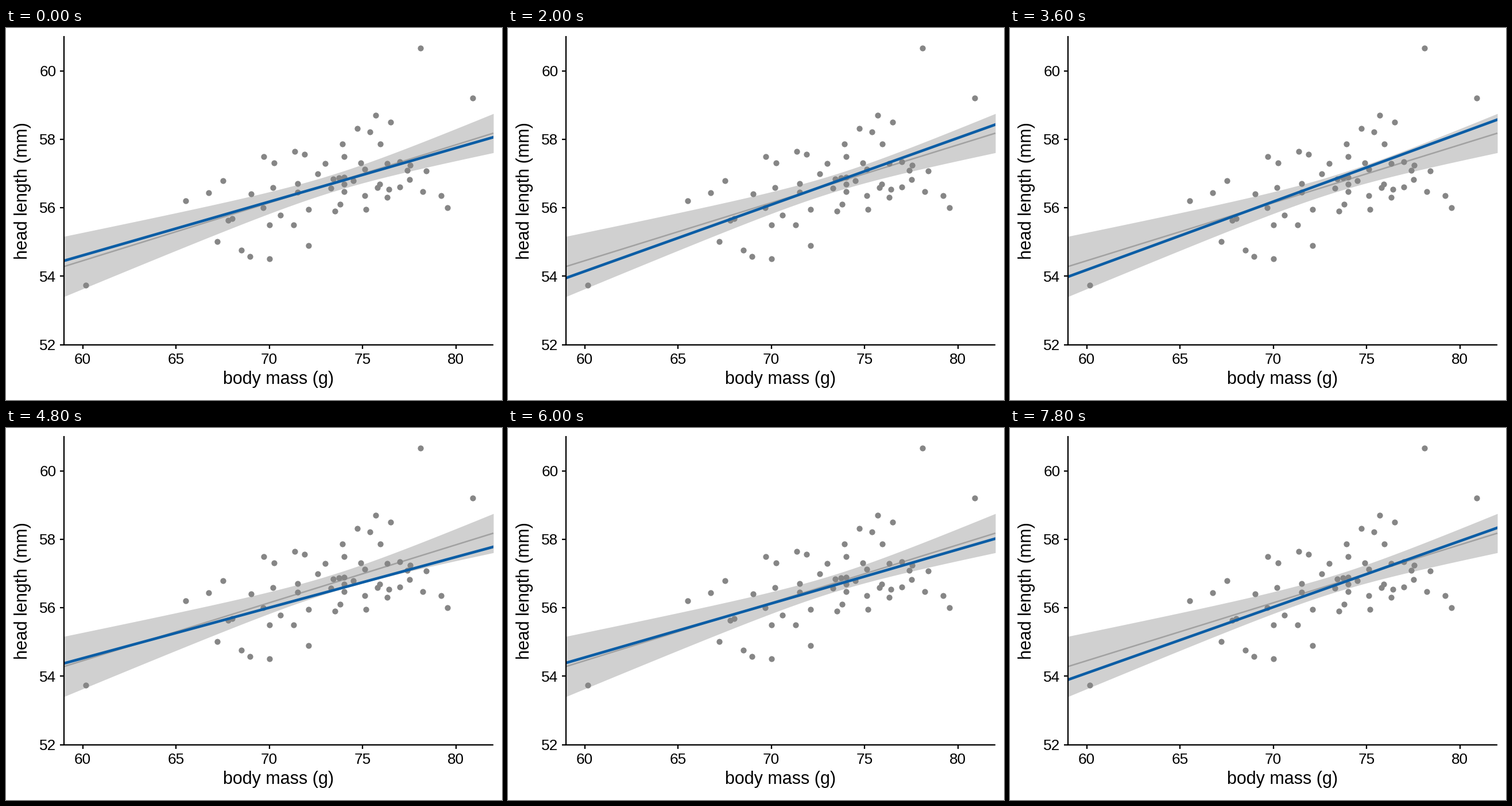
A matplotlib script that plays this animation: 864x648 px, repeating every 8 s.

```python
import numpy as np
import matplotlib.pyplot as plt
from matplotlib.animation import FuncAnimation
from matplotlib.patches import Rectangle

W, H = 864, 648
LEFT, RIGHT, TOP, BOTTOM = 101, 849, 14, 551.5
BLUE, POINT, MEAN, BAND = "#0b5da5", "#868686", "#a2a2a2", "#d0d0d0"
STEP_MS, FRAMES = 200, 40

plt.rcParams["font.family"] = "Liberation Sans"

# scatter, in stage pixels
POINTS = np.array([
    (722, 34.5), (813, 122.3), (644, 152), (670, 164), (611.5, 175.3),
    (634, 181), (585.5, 202), (652, 202), (502.5, 215.3), (520.3, 220),
    (449, 223.5), (588.5, 223.5), (467, 234.5), (556, 235.5), (618, 234.5),
    (663.5, 235.5), (686, 233), (703.5, 238.5), (699, 247.5), (624.5, 246),
    (732, 249.3), (543, 253.5), (377.5, 265.5), (569.5, 262.5), (580, 260.5),
    (588.5, 259.5), (605, 265.5), (702.5, 264.3), (588.5, 271.5),
    (507.5, 271), (465, 278), (566, 278.5), (650.5, 271.5), (647, 277.5),
    (667, 281), (686, 276.5), (725.5, 284.5), (588.5, 284.5), (507.5, 286.3),
    (353, 286.8), (426.5, 289.3), (624.5, 291.8), (663.5, 295.3),
    (758, 292.3), (312.5, 301), (582, 307.2), (448, 312.8), (769, 313.2),
    (527, 315.5), (572.5, 318.5), (627, 315.5), (478, 325.5), (387, 334.5),
    (393.5, 332), (459, 343), (501, 343), (368, 371.5), (410, 387),
    (424.5, 397.7), (527, 378.7), (459, 402), (139, 448),
])

# heights of each drawn fit at the left and right edge of the panel
DRAWS = [
    (405.5, 190.2), (402, 187.8), (440.5, 172.8), (399, 188.5),
    (433.5, 150.7), (435.5, 168.2), (425.5, 173.7), (424.5, 187),
    (406, 185.7), (433.3, 159.6), (399.5, 208), (395, 205.8),
    (410, 207), (394, 198.7), (399.5, 189.7), (409.2, 192.7),
    (408.5, 171.7), (403, 190), (445.5, 172.7), (416, 183), (438.5, 173.8),
]


def mass_px(mass):
    return 133.5 + 32.5 * (mass - 60)


def head_px(head):
    return 551.5 - 59.61 * (head - 52)


fig = plt.figure(figsize=(W / 72, H / 72), dpi=72, facecolor="white")
ax = fig.add_axes([0, 0, 1, 1])
ax.set_xlim(0, W)
ax.set_ylim(H, 0)
ax.axis("off")

panel = Rectangle((LEFT, TOP), RIGHT - LEFT, BOTTOM - TOP,
                  transform=ax.transData, visible=False)
ax.add_patch(panel)

# mean fit with its confidence band
x = np.linspace(LEFT, RIGHT, 80)
mean = np.interp(x, [LEFT, RIGHT], [415.5, 183.2])
half = np.hypot(15, 0.1081 * (x - 566))
ax.fill_between(x, mean - half, mean + half, color=BAND, lw=0, zorder=1)
ax.plot(x, mean, color=MEAN, lw=2.6, solid_capstyle="butt", zorder=2)
ax.scatter(*POINTS.T, s=106, color=POINT, linewidths=0, zorder=3)

fit, = ax.plot([], [], color=BLUE, lw=4.7, zorder=4)
fit.set_clip_path(panel)


def stroke(xs, ys):
    ax.plot(xs, ys, color="black", lw=2.3, solid_capstyle="butt", zorder=5)


def label(x, y, text, size, **kw):
    ax.text(x, y, text, size=size, color="black", va="baseline",
            rotation_mode="anchor", **kw)


stroke([LEFT, LEFT], [TOP, BOTTOM + 1.1])
stroke([LEFT - 1.1, RIGHT], [BOTTOM, BOTTOM])
for mass in range(60, 81, 5):
    px = mass_px(mass)
    stroke([px, px], [BOTTOM, BOTTOM + 7.5])
    label(px, 585, str(mass), 26.1, ha="center")
for head in range(52, 61, 2):
    py = head_px(head)
    stroke([LEFT - 7.5, LEFT], [py, py])
    label(87.5, py + 9.3, str(head), 26.1, ha="right")
label(475, 620, "body mass (g)", 30.5, ha="center")
label(37, 283.5, "head length (mm)", 30.5, ha="center", rotation=90)


def update(frame):
    # each draw holds two steps, except a single-step one at 6 s
    n = frame // 2 if frame < 30 else (frame + 1) // 2
    left, right = DRAWS[n]
    slope = (right - left) / (RIGHT - LEFT)
    pad = 6
    fit.set_data([LEFT - pad, RIGHT + pad],
                 [left - pad * slope, right + pad * slope])
    return fit,


anim = FuncAnimation(fig, update, frames=FRAMES, interval=STEP_MS,
                     repeat=True, repeat_delay=0)
plt.show()
```
